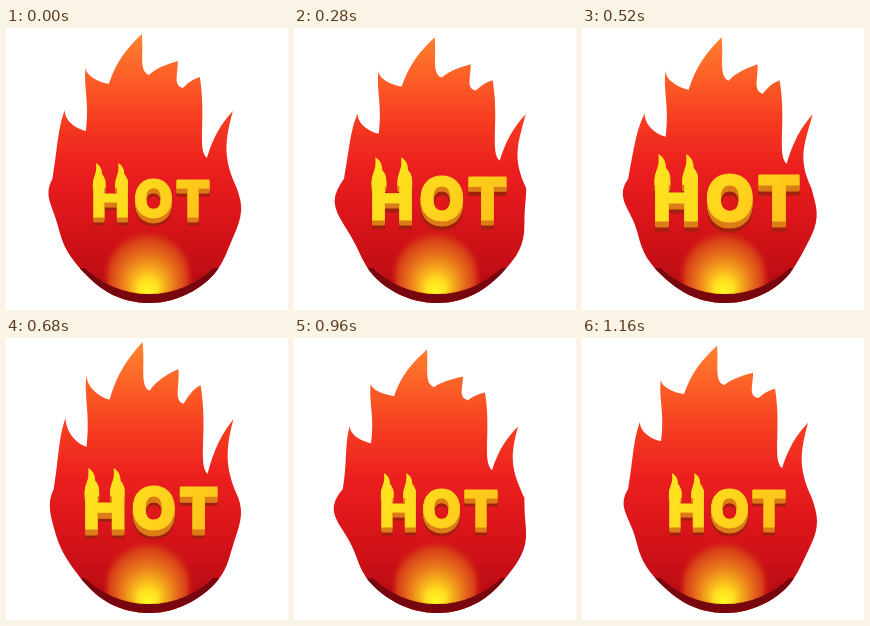
Write an HTML page with a canvas that moves like this. It is 282 px wide and 282 px high and loops after 1200 ms.

```html
<!DOCTYPE html>
<html lang="en">
<head>
<meta charset="utf-8">
<title>Hot flame</title>
<style>
html, body { margin: 0; width: 100%; height: 100%; overflow: hidden; background: #fff; }
canvas { display: block; width: 282px; height: 282px; }
</style>
</head>
<body>
<canvas id="stage" width="282" height="282"></canvas>
<script>
const ctx = document.getElementById('stage').getContext('2d');
const LOOP = 1200, STEP = 40, SIZE = 282;
const { sin, cos, PI } = Math;

// Resting crest of the flame from left to right: tip, gap, tip, ...
const CREST = [
  [60, 84], [81, 106], [81, 41], [104, 59], [137, 8], [144, 50],
  [173, 35], [178, 63], [195, 51], [202, 133], [228, 85]
];
const ORB = { x: 143, y: 179, rx: 90, ry: 96 };

// Tips bob twice per loop, gaps once; everything leans together
function sway([x, y], i, a) {
  const bob = i % 2 ? 3 * sin(a - 1.6) : -4 * sin(2 * a + 0.5);
  return [x + 4 * sin(a - 0.3), y + bob];
}

// Round lower body with ripples that climb its sides
function rim(angle, a) {
  const y = ORB.y + ORB.ry * sin(angle);
  const side = cos(angle);
  const ripple = 2.2 * side * side * sin(y / 12 + 2 * a - 1);
  const hip = side < 0 ? 12 * Math.exp(-(((y - 166) / 28) ** 2)) : 0;
  return [ORB.x + ORB.rx * side + ripple - hip, y];
}

function flamePath(a) {
  const path = new Path2D();
  const right = -0.2, left = PI + 0.3;
  let [x, y] = rim(left, a);
  path.moveTo(x, y);

  const rise = (tx, ty) => {
    const dx = tx - x, dy = ty - y;
    path.bezierCurveTo(x + 4 + 0.1 * dx, y + 0.45 * dy, tx - 3 - 0.35 * dx, ty - 0.28 * dy, tx, ty);
    [x, y] = [tx, ty];
  };
  const fall = (tx, ty) => {
    const dy = ty - y;
    path.bezierCurveTo(x - 3 + 0.12 * dy, y + 0.5 * dy, tx - 10, ty - 0.1 * dy, tx, ty);
    [x, y] = [tx, ty];
  };
  CREST.forEach((p, i) => (i % 2 ? fall : rise)(...sway(p, i, a)));

  const [ex, ey] = rim(right, a);
  path.bezierCurveTo(x - 8, y + 30, ex - 14, ey - 30, ex, ey);
  for (let k = 1; k <= 60; k++) path.lineTo(...rim(right + (left - right) * k / 60, a));
  path.closePath();
  return path;
}

function gradient(g, ...colors) {
  colors.forEach((c, i) => g.addColorStop(i / (colors.length - 1), c));
  return g;
}

const bodyFill = gradient(ctx.createLinearGradient(0, 5, 0, 275),
  '#ff8330', '#fc5e27', '#f53a20', '#ec1f1e', '#dc161a', '#c80f16', '#ab0a11');
const glowFill = gradient(ctx.createRadialGradient(142, 264, 2, 142, 247, 46),
  '#fff626', '#ffe020', '#f7b01d', '#ec851b', '#e2601a', '#d83f18', 'rgba(212,28,22,0)');
const faceFill = gradient(ctx.createLinearGradient(85, 135, 205, 195),
  '#ffe61f', '#ffd61d', '#ffbd1a');

function drawBody(a) {
  const flame = flamePath(a);
  ctx.fillStyle = bodyFill;
  ctx.fill(flame);
  ctx.save();
  ctx.clip(flame);
  ctx.fillStyle = glowFill;
  ctx.fillRect(90, 190, 106, 92);
  ctx.fillStyle = '#78060f';
  ctx.beginPath();
  ctx.rect(0, 235, SIZE, SIZE);
  ctx.ellipse(ORB.x, 170, 94, 96, 0, 0, 2 * PI);
  ctx.clip('evenodd');
  ctx.fillRect(0, 240, SIZE, SIZE);
  ctx.restore();
}

// Flame-shaped top of a stem
function lick(x, w) {
  ctx.beginPath();
  ctx.moveTo(x, 160);
  ctx.bezierCurveTo(x - 1, 148, x + 5, 146, x + 3, 135);
  ctx.bezierCurveTo(x + 8, 138, x + 9, 142, x + 9, 146);
  ctx.quadraticCurveTo(x + w + 1, 150, x + w, 160);
  ctx.fill();
}

function drawLetters(fill, dy) {
  ctx.save();
  ctx.translate(0, dy);
  ctx.fillStyle = ctx.strokeStyle = fill;
  [['H', 104.5], ['O', 147.5], ['T', 187]].forEach(([ch, x]) => {
    ctx.fillText(ch, x, 189);
    ctx.strokeText(ch, x, 189);
  });
  const { actualBoundingBoxLeft: l, actualBoundingBoxRight: r } = ctx.measureText('H');
  const stem = 12.5;
  lick(104.5 - l - 0.4, stem);
  lick(104.5 + r + 0.4 - stem, stem);
  ctx.restore();
}

function drawWord(t) {
  const phase = Math.max(-1, Math.min(1, (t - 470) / 450));
  const scale = 1 + 0.25 * cos(phase * PI / 2) ** 2;
  ctx.save();
  ctx.translate(146, 172);
  ctx.scale(scale, scale);
  ctx.translate(-146, -172);
  ctx.font = '900 51px Inter, "Open Sans", sans-serif';
  ctx.textAlign = 'center';
  ctx.lineWidth = 0.8;
  ctx.lineJoin = 'round';
  for (let dy = 8; dy >= 1; dy--) drawLetters(dy > 5 ? '#a3200f' : '#dc7d17', dy);
  drawLetters(faceFill, 0);
  ctx.restore();
}

function draw(now) {
  const t = Math.floor((now % LOOP) / STEP) * STEP;
  ctx.clearRect(0, 0, SIZE, SIZE);
  drawBody(2 * PI * t / LOOP);
  drawWord(t);
  requestAnimationFrame(draw);
}
requestAnimationFrame(draw);
</script>
</body>
</html>
```
